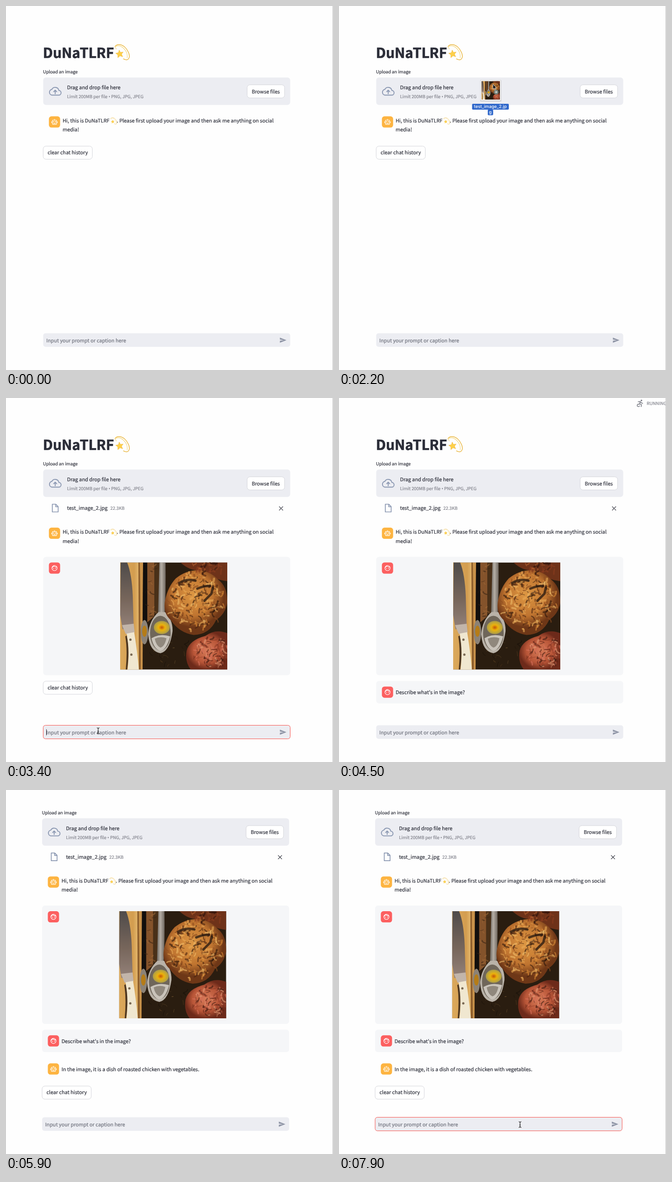
An HTML page for the animation above (8 s loop, 699 by 778 pixels).

```html
<!DOCTYPE html>
<html lang="en">
<head>
<meta charset="utf-8">
<title>Image chat demo</title>
<style>
  html, body { margin: 0; width: 100%; height: 100%; overflow: hidden; background: #fefefe; }
  svg { display: block; }
  text {
    font: 10.78px "Noto Sans CJK SC", "Noto Sans CJK JP", "Noto Sans CJK", "Open Sans", sans-serif;
    fill: #2b2d38; stroke: #2b2d38; stroke-width: .2;
    text-rendering: geometricPrecision; white-space: pre;
  }
  text.small { font-size: 9.42px; }
  text.soft { fill: #80828b; stroke: #80828b; }
  text.hint { fill: #6d707b; stroke: #6d707b; }
  text.title { font-size: 29.6px; font-weight: 700; stroke-width: .7; }
  text.mid { text-anchor: middle; }
  text.label { font: 500 9.4px Inter, sans-serif; fill: #fff; stroke: none; text-anchor: middle; }
  .dot { font-family: "Open Sans", sans-serif; }
  .panel { fill: #ecedf2; }
  .bubble { fill: #f5f6f8; }
  .button { fill: #fff; stroke: #d5d6db; }
  .line { fill: none; stroke-linecap: round; stroke-linejoin: round; }
</style>
</head>
<body>
<svg width="699" height="778" viewBox="0 0 699 778">
  <defs>
    <g id="comet">
      <path class="line" stroke="#e9b53c" stroke-width="1.400" d="M2 6C5 0 15 0 22 6S35 24 32 30 25 34 20 32"/>
      <path class="line" stroke="#f6da85" stroke-width="1.200" d="M2 6C8 3 15 4 21 10S29 23 28 30M2 6L5 11"/>
      <path fill="#fdd04a" stroke="#eeb32f" stroke-width=".6" d="M11 13L13.500 18 19.500 17.500 16 22 18.500 27.500 12.800 25.500 8 29.500 8 23.500 3.500 20 9.300 18.800Z"/>
    </g>
    <g id="bot">
      <rect width="24" height="24" rx="5.500" fill="#fdb441"/>
      <g class="line" stroke="#fff" stroke-width="1.200">
        <rect x="7.500" y="8.200" width="9" height="8.800" rx="1"/>
        <path d="M12 8V6.200M5.800 11.500V13.500M18.200 11.500V13.500M10 14.800H14"/>
      </g>
      <path fill="#fff" d="M9 10.500h2v2H9zM13 10.500h2v2H13z"/>
    </g>
    <g id="face">
      <rect width="24" height="24" rx="5.500" fill="#fc6060"/>
      <g class="line" stroke="#fff" stroke-width="1.200">
        <circle cx="12" cy="12" r="5.500"/>
        <path d="M6.800 10.800Q9.500 10 10.500 7Q13 10.300 17.200 9.800"/>
      </g>
      <path fill="#fff" d="M9 12h1.600v1.600H9zM13.400 12h1.600v1.600H13.400z"/>
    </g>
    <clipPath id="frame"><rect width="229" height="229"/></clipPath>
    <linearGradient id="wood"><stop stop-color="#dba95c"/><stop offset=".7" stop-color="#d39d50"/><stop offset="1" stop-color="#e8bf76"/></linearGradient>
    <linearGradient id="steel"><stop stop-color="#6a655f"/><stop offset=".45" stop-color="#b5aea5"/><stop offset="1" stop-color="#6f675f"/></linearGradient>
    <linearGradient id="blade" x2="0" y2="1"><stop stop-color="#4f4b4a"/><stop offset=".55" stop-color="#77665b"/><stop offset="1" stop-color="#94827a"/></linearGradient>
    <radialGradient id="roast" cx=".45" cy=".38"><stop stop-color="#dd9743"/><stop offset=".65" stop-color="#bf7430"/><stop offset="1" stop-color="#6e3717"/></radialGradient>
    <radialGradient id="rare" cx=".5" cy=".5"><stop stop-color="#d67b58"/><stop offset=".65" stop-color="#b95638"/><stop offset="1" stop-color="#6d2a1a"/></radialGradient>
    <radialGradient id="oil"><stop stop-color="#c4540a"/><stop offset=".4" stop-color="#ecb00a"/><stop offset="1" stop-color="#e8cf30" stop-opacity=".5"/></radialGradient>
    <g id="photo" clip-path="url(#frame)">
      <path fill="#2a1d10" d="M0 0H229V229H0z"/>
      <path fill="url(#wood)" d="M0 0H41L43 229H0z"/>
      <path fill="#8d5d2b" d="M39 0H42L44 229H40z"/>
      <path fill="#c9924a" d="M42 0H49L48 229H44z"/>
      <path fill="#120f0d" d="M49 0H58V135H48z"/>
      <path fill="#84532b" d="M58 0H73V115L58 128z"/>
      <path fill="#493018" d="M73 0H85V110H73z"/>
      <g id="flecks" class="line"></g>
      <path fill="url(#blade)" d="M1 0H15Q25 25 27 72L29 139 5 143 0 112z"/>
      <path fill="#c2b5aa" d="M4 134L29 131 31 150 12 153z"/>
      <path fill="#f0e7d0" d="M14 152L30 149Q36 185 40 229H16Q20 190 14 152z"/>
      <path fill="#4c3620" d="M14 156Q21 187 15 229H12Q16 187 11 158z"/>
      <g fill="#7a6a55"><circle cx="22" cy="165" r="2.500"/><circle cx="24" cy="197" r="2.500"/></g>
      <ellipse cx="52" cy="149" rx="8" ry="26" fill="#8b8277"/>
      <ellipse cx="52" cy="147" rx="5" ry="12" fill="#b57c18"/>
      <path fill="url(#steel)" d="M84 0H97Q98 60 95 112H81z"/>
      <path fill="#b9b2a8" d="M82 106H96Q113 123 112 147Q106 190 86 194Q62 190 60 153Q62 124 82 106z"/>
      <ellipse cx="86" cy="151" rx="22" ry="37" fill="#6f665a"/>
      <path fill="#c9c3ba" d="M67 162Q85 151 107 158Q99 187 86 189Q72 185 67 162z"/>
      <path fill="#90887d" d="M74 163Q86 157 99 162Q95 180 86 182Q77 178 74 163z"/>
      <ellipse cx="89" cy="139" rx="17" ry="14" fill="url(#oil)"/>
      <path fill="#6e3219" d="M129 0H229V40Q196 36 177 17Q150 20 129 0z"/>
      <path fill="url(#roast)" d="M119 34Q143 15 170 17Q193 19 210 37Q230 52 229 87Q224 111 205 123Q191 154 157 155Q126 150 108 123Q91 108 96 81Q102 52 119 34z"/>
      <path fill="url(#rare)" d="M142 189Q148 166 182 157Q204 141 229 151V229H151Q138 213 142 189z"/>
      <g id="char" class="line"></g>
    </g>
  </defs>

  <g id="page">
    <text class="title" x="79" y="111.300">DuNaTLRF</text>
    <use href="#comet" x="231" y="81"/>
    <text class="small" x="79" y="144.200">Upload an image</text>
    <rect class="panel" x="79.500" y="152.800" width="528" height="58.700" rx="6"/>
    <g class="line" stroke="#8a97b1" stroke-width="1.900">
      <path d="M98 190.500H112.500A5 5 0 0 0 113 180.500A8 8 0 0 0 98 178.300A6.200 6.200 0 0 0 98 190.500z"/>
      <path d="M105.200 187.500V180.500M102 183.200L105.200 180 108.400 183.200"/>
    </g>
    <text x="130.500" y="178.200">Drag and drop file here</text>
    <text class="small soft" x="130.500" y="197">Limit 200MB per file <tspan class="dot">•</tspan> PNG, JPG, JPEG</text>
    <rect class="button" x="515.500" y="168.500" width="80" height="28" rx="6"/>
    <text class="mid" x="555.300" y="186.500">Browse files</text>

    <g id="file">
      <path class="line" stroke="#8a97b1" stroke-width="1.700" d="M99 227H106.500L111.500 232V243.500H99zM106.300 227.500V232.300H111"/>
      <text x="130.500" y="239.300">test_image_2.jpg</text>
      <text class="small soft" x="223" y="239">22.3KB</text>
      <path class="line" stroke="#2b2d38" stroke-width="1.200" d="M584.200 232.200L591.800 239.800M591.800 232.200L584.200 239.800"/>
    </g>

    <g id="greet">
      <use href="#bot" x="91.700" y="235.800"/>
      <text x="121" y="249.200">Hi, this is DuNaTLRF</text>
      <use href="#comet" transform="translate(223 238) scale(.43)"/>
      <text x="236.800" y="249.200">. Please first upload your image and then ask me anything on social</text>
      <text x="121" y="268.300">media!</text>
    </g>

    <g id="shot">
      <rect class="bubble" x="79.500" y="339.500" width="528" height="253" rx="6"/>
      <use href="#face" x="91.700" y="351.500"/>
      <use href="#photo" x="244" y="351.500"/>
    </g>
    <g id="ask">
      <rect class="bubble" x="79.500" y="604.700" width="528" height="48" rx="6"/>
      <use href="#face" x="91.700" y="616.700"/>
      <text x="121" y="633.200">Describe what's in the image?</text>
    </g>
    <g id="answer">
      <use href="#bot" x="91.700" y="676.700"/>
      <text x="121" y="693.200">In the image, it is a dish of roasted chicken with vegetables.</text>
    </g>
    <g id="clear">
      <rect class="button" x="79.500" y="299.500" width="105" height="28" rx="6"/>
      <text class="mid" x="132" y="317.200">clear chat history</text>
    </g>
  </g>

  <path fill="#fefefe" d="M0 0H699V36H0z"/>
  <g id="running">
    <g class="line" stroke="#7b7d86" stroke-width="1.600">
      <circle cx="646.500" cy="5.300" r="1"/>
      <path d="M639.500 8L644 7.500 642.500 12.500 646.500 14 646 18.500M644.500 9L649 11.500M642 13.500Q637 12 637.500 17Q640 20 642.500 17"/>
    </g>
    <text class="small soft" x="657.800" y="15.300">RUNNING</text>
  </g>

  <g id="bar">
    <rect id="box" class="panel" x="79.500" y="699.500" width="528" height="29" rx="5"/>
    <text id="entry" x="86" y="718.700"></text>
    <path id="caret" stroke="#2b2d38" d="M0 708V721"/>
    <path fill="#8f95a6" d="M585.500 708.700L599.500 714.200 585.500 719.800V715.500L594 714.200 585.500 713z"/>
  </g>

  <g id="ghost">
    <rect x="-27" y="-8" width="45" height="45" fill="#0002"/>
    <rect x="-26.500" y="-8.500" width="43.500" height="43.500" fill="#fff" stroke="#c9c9c9" stroke-width=".6"/>
    <use href="#photo" transform="translate(-24.500 -6.500) scale(.173)"/>
    <rect x="-44.500" y="42" width="78.500" height="12.500" rx="2" fill="#3068cb"/>
    <rect x="-11" y="54" width="11.500" height="12.500" rx="2" fill="#3068cb"/>
    <text class="label" x="-5.500" y="51.300">test_image_2.jp</text>
    <text class="label" x="-5.500" y="63">g</text>
    <circle cx="7" cy="17" r="5.300" fill="#748078"/>
    <path stroke="#fff" d="M4.500 17H9.500M7 14.500V19.500"/>
  </g>
  <path id="arrow" fill="#111" stroke="#fff" stroke-width=".8" d="M0 0V11L2.600 8.700 4.300 12.500 6 11.700 4.300 8H7.800z"/>
  <path id="beam" class="line" stroke="#222" stroke-width="1.200" d="M-2.500 -6Q0 -6 0 -4Q0 -6 2.500 -6M0 -4V4M-2.500 6Q0 6 0 4Q0 6 2.500 6M-1 1H1"/>
  <path stroke="#c8c8c8" d="M698.500 0V778"/>
</svg>
<script>
const LOOP = 8000, DROP = 2400, SHOT = 2600, FOCUS = 3300, TYPE = 3600,
      SEND = 4400, REPLY = 5100, REFOCUS = 7400;
const PROMPT = "Describe what's in the image?", HINT = "Input your prompt or caption here";
const el = id => document.getElementById(id);
const show = (id, on) => el(id).style.display = on ? "" : "none";
const move = (id, x, y) => el(id).setAttribute("transform", `translate(${x} ${y})`);
const part = (t, from, to) => Math.min(1, Math.max(0, (t - from) / (to - from)));
const mix = (a, b, k) => a + (b - a) * k;
const smooth = k => k * k * (3 - 2 * k);

let seed = 7;
const random = () => (seed = seed * 16807 % 2147483647) / 2147483647;

// Scatters short curved strokes over an ellipse.
function addMarks(id, cx, cy, rx, ry, count, width, colours) {
  let marks = "";
  for (let i = 0; i < count; i++) {
    const a = random() * 6.28, r = Math.sqrt(random()), b = random() * 6.28, size = 3 + random() * 9;
    const x = cx + rx * r * Math.cos(a), y = cy + ry * r * Math.sin(a);
    const dx = size * Math.cos(b), dy = size * Math.sin(b);
    marks += `<path d="M${x} ${y}q${dx} ${dy / 3} ${dx} ${dy}" stroke="${colours[i % colours.length]}"
      stroke-width="${width * (0.3 + random())}" opacity=".6"/>`;
  }
  el(id).innerHTML += marks;
}
addMarks("flecks", 105, 190, 40, 36, 26, 1, ["#6b4c26", "#0f0a06", "#8a6a3a"]);
addMarks("flecks", 66, 60, 7, 60, 16, 2, ["#a06a38", "#3a2413"]);
addMarks("char", 162, 84, 58, 60, 210, 3.5, ["#4a2410", "#e9ab55", "#8a4a1d", "#d98a36", "#f0bc6a", "#2e170b"]);
addMarks("char", 196, 194, 40, 32, 110, 3, ["#571d12", "#e39a76", "#96402a", "#d9705a", "#3b1a10"]);
addMarks("char", 190, 8, 34, 12, 36, 3, ["#2a120a", "#b5622f", "#8a3d1e"]);
el("char").innerHTML += `<g stroke="#24170f" stroke-width="5">
  <path d="M126 44Q142 34 161 39M180 82L195 67 198 54M165 56Q181 49 192 51" opacity=".75"/></g>`;

function pointer(t) {
  if (t >= 1100 && t < SHOT) {
    const k = 1 - (1 - part(t, 1100, 2100)) ** 3;
    return [mix(345, 329, k), mix(-70, 167, k)];
  }
  if (t >= SHOT && t < TYPE) {
    const k = smooth(part(t, SHOT, 3200));
    return [mix(329, 197, k), mix(167, 711, k)];
  }
  if (t >= 6700) {
    const k = smooth(part(t, 6900, 7200));
    return [mix(373, 387, k), mix(752, 715, k)];
  }
  return null;
}

function draw(t) {
  const replied = t >= REPLY, sent = t >= SEND, shot = t >= SHOT, dropped = t >= DROP;
  move("page", replied ? -2.3 : 0, replied ? -92.4 : 0);
  move("bar", replied ? -2.3 : 0, 0);
  move("greet", 0, dropped ? 41.3 : 0);
  move("clear", 0, replied ? 425.7 : shot ? 305.7 : dropped ? 41.3 : 0);
  show("file", dropped);
  show("shot", shot);
  show("ask", sent);
  show("answer", replied);
  show("clear", !sent || replied);
  show("running", dropped && t < 2700 || sent && !replied);

  const focused = t >= FOCUS && !sent || t >= REFOCUS;
  const typed = sent ? "" : PROMPT.slice(0, Math.floor(PROMPT.length * part(t, TYPE, 4250)));
  el("box").setAttribute("stroke", focused ? "#f7564f" : "none");
  el("entry").textContent = typed || HINT;
  el("entry").setAttribute("class", typed ? "" : "hint");
  show("caret", focused && !sent);
  move("caret", 86.5 + (typed ? el("entry").getComputedTextLength() : 0), 0);

  const at = pointer(t), overInput = at && at[1] > 700 && at[1] < 729;
  show("ghost", at && !dropped);
  show("arrow", at && !overInput);
  show("beam", overInput);
  if (at) for (const id of ["ghost", "arrow", "beam"]) move(id, ...at);
}

function tick() {
  draw(performance.now() % LOOP);
  requestAnimationFrame(tick);
}
tick();
</script>
</body>
</html>
```
